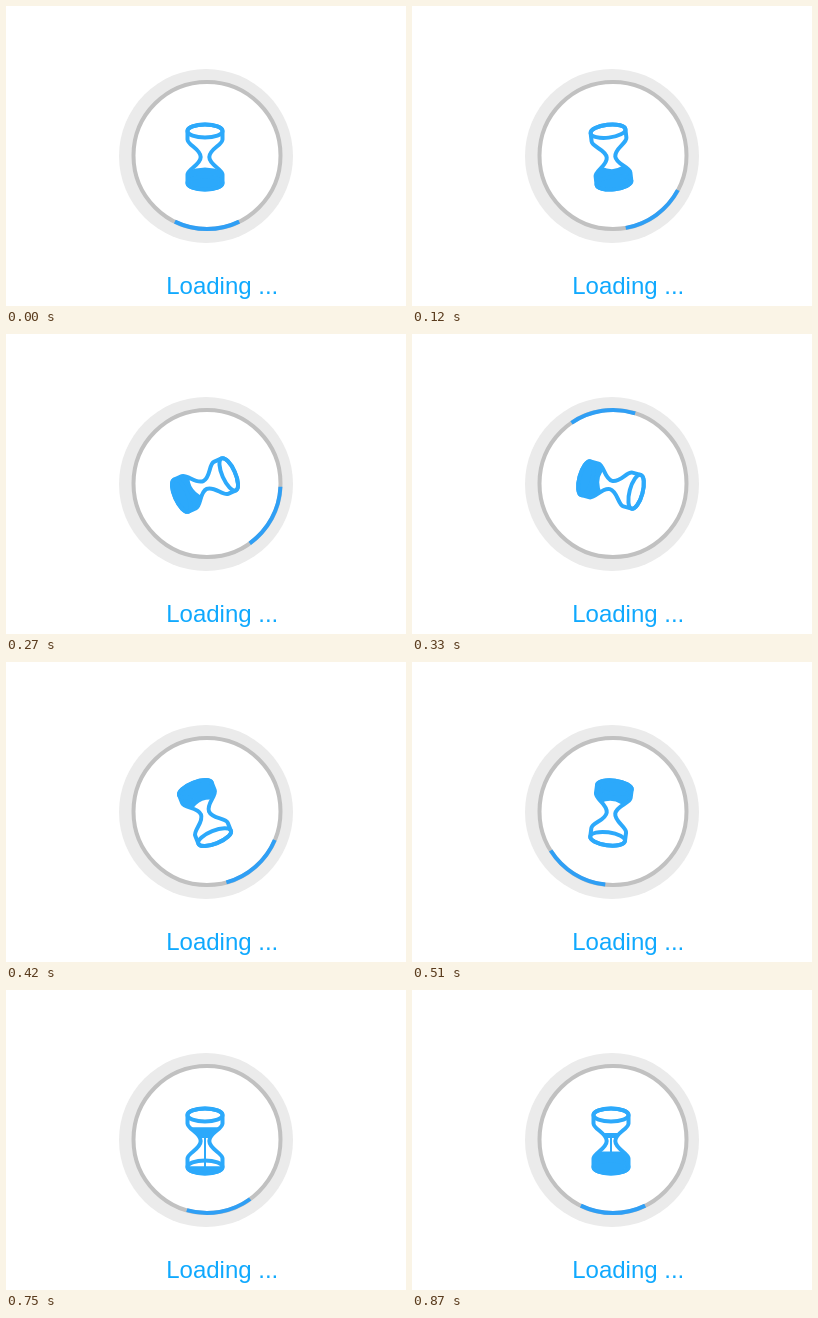
Recreate the animation shown at these times as an HTML page. Size 400x300 px, loop 900 ms.

```html
<!DOCTYPE html>
<html lang="en">
<head>
<meta charset="utf-8">
<title>Loading</title>
<style>
  html, body { margin: 0; width: 100%; height: 100%; overflow: hidden; background: #fff; }
  svg { display: block; width: 400px; height: 300px; }
  text { font: 24px "Liberation Sans", Arial, sans-serif; fill: #10a9fe; }
</style>
</head>
<body>
<svg viewBox="0 0 400 300">
  <defs>
    <path id="glass" d="M-17.5-26A17.5 6.5 0 0 1 17.5-26V-17.5C17.5-12 4.3-8 4.3 0S17.5 12 17.5 17.5V26A17.5 6.5 0 0 1-17.5 26V17.5C-17.5 12-4.3 8-4.3 0S-17.5-12-17.5-17.5Z"/>
    <clipPath id="inside"><use href="#glass"/></clipPath>
  </defs>
  <circle cx="200" cy="150" r="87" fill="#ebebeb"/>
  <circle cx="201" cy="149.5" r="73.5" fill="#fff" stroke="#c1c1c1" stroke-width="4"/>
  <circle id="arc" cx="201" cy="149.5" r="73.5" fill="none" stroke="#2f9ff5" stroke-width="4"
    pathLength="360" stroke-dasharray="52 308" stroke-dashoffset="26"/>
  <g id="hourglass" fill="none" stroke="#2ca9fb" stroke-width="4">
    <path id="sand" clip-path="url(#inside)" fill="#2ca9fb" stroke="none"/>
    <use href="#glass"/>
    <ellipse cy="-26" rx="17.5" ry="6.5"/>
    <ellipse cy="26" rx="17.5" ry="6.5"/>
  </g>
  <text x="160.2" y="288">Loading ...</text>
</svg>
<script>
const LOOP = 900, STEP = 30, FLOW_START = 540;
const byId = id => document.getElementById(id);
const arc = byId('arc'), hourglass = byId('hourglass'), sand = byId('sand');

// Keys are [ms, value] pairs.
const arcTurn = [[0, 0], [105, -39], [210, 71.5], [330, 531.6], [510, 752], [540, 755.5],
                 [630, 738.8], [750, 710], [870, 720]];
const glassTurn = [[0, 0], [100, -8.5], [210, 29.4], [330, 105], [510, 187.5], [600, 180]];
const surfaceTilt = [[0, 0], [120, 5], [210, -16], [330, -14], [510, 0]];
const surfaceBend = [[0, 1], [100, -2.4], [540, -2.4]];
const topLevel = [[540, -36], [630, -25], [870, -8]];
const streamEnd = [[540, -10], [630, 4], [690, 34]];
const bottomLevel = [[660, 35], [870, 10.5]];

// Smooth interpolation that never overshoots its keys.
function sample(keys, t) {
  const last = keys.length - 1;
  if (t <= keys[0][0]) return keys[0][1];
  if (t >= keys[last][0]) return keys[last][1];
  const i = keys.findIndex(key => key[0] > t) - 1;
  const slope = k => (keys[k + 1][1] - keys[k][1]) / (keys[k + 1][0] - keys[k][0]);
  const tangent = k => {
    if (k === 0 || k === last) return 0;
    const a = slope(k - 1), b = slope(k);
    return a * b > 0 ? 2 * a * b / (a + b) : 0;
  };
  const [t0, v0] = keys[i], [t1, v1] = keys[i + 1];
  const span = t1 - t0, u = (t - t0) / span, w = 1 - u;
  return w * w * ((1 + 2 * u) * v0 + u * span * tangent(i))
       + u * u * ((3 - 2 * u) * v1 - w * span * tangent(i + 1));
}

const band = (halfWidth, top, bottom) =>
  `M${-halfWidth} ${top}H${halfWidth}V${bottom}H${-halfWidth}Z`;

function settledSand(t) {
  const bend = sample(surfaceBend, t);
  const lift = 20 * Math.tan(sample(surfaceTilt, t) * Math.PI / 180);
  const edge = 11 + 4 * bend;
  return `M-20 ${edge - lift}Q0 ${11 - 5 * bend} 20 ${edge + lift}V36H-20Z`;
}

function flowingSand(t) {
  const end = sample(streamEnd, t);
  return band(20, sample(topLevel, t), Math.min(end, -3))
       + (end > -3 ? band(1, -4, end) : '')
       + band(20, sample(bottomLevel, t), 36);
}

function draw(now) {
  const t = Math.floor(now % LOOP / STEP) * STEP;
  const flowing = t >= FLOW_START;
  const turn = sample(glassTurn, t) - (flowing ? 180 : 0);
  arc.setAttribute('transform', `rotate(${90 + sample(arcTurn, t)} 201 149.5)`);
  hourglass.setAttribute('transform', `translate(199 151) rotate(${turn})`);
  sand.setAttribute('d', flowing ? flowingSand(t) : settledSand(t));
}

const start = performance.now();
function tick() {
  draw(performance.now() - start);
  requestAnimationFrame(tick);
}
tick();
</script>
</body>
</html>
```
